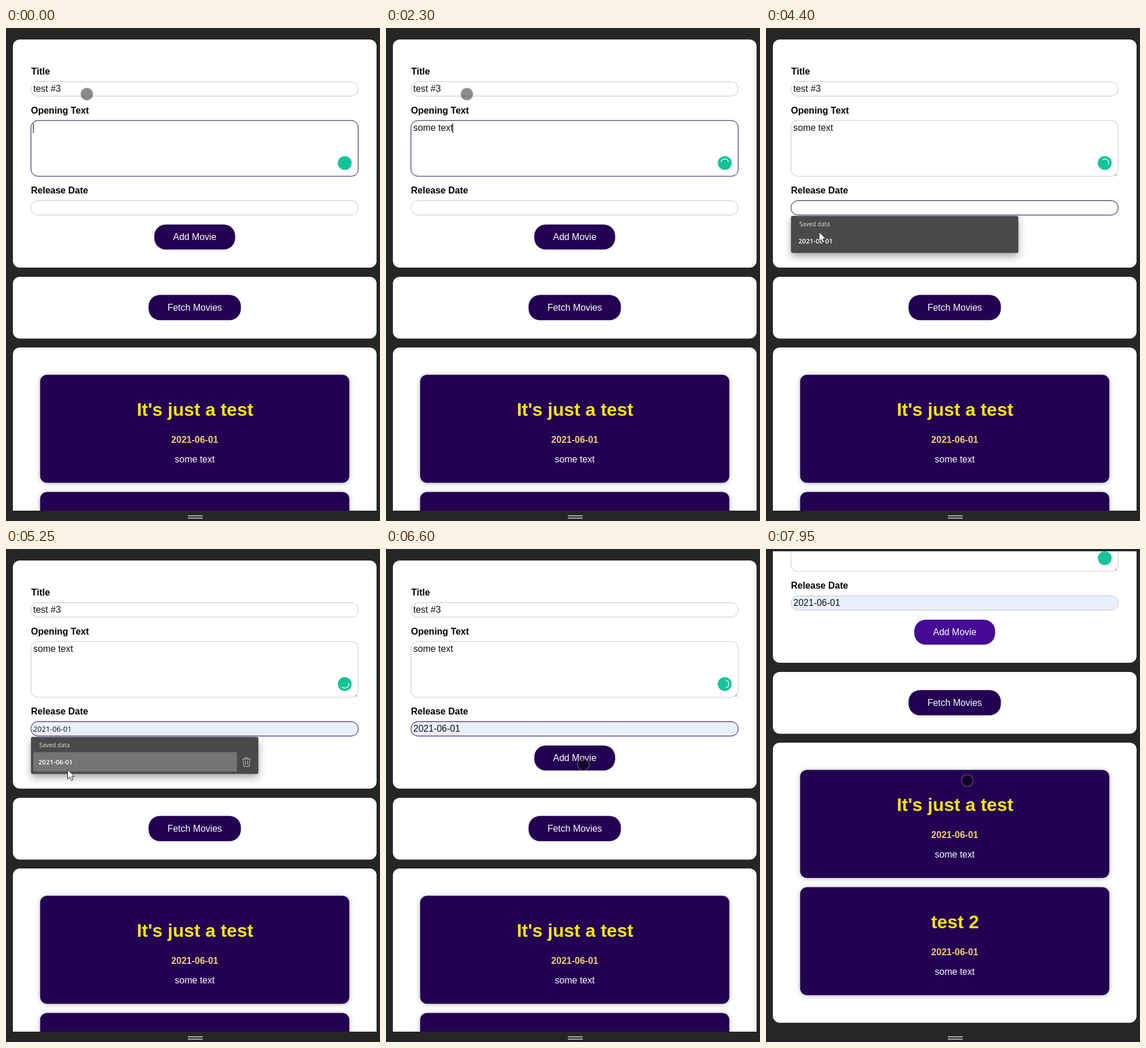
An HTML page for the animation above (8 s loop, 652 px wide and 858 px high).

```html
<!DOCTYPE html>
<html lang="en">
<head>
<meta charset="utf-8">
<title>Movie form</title>
<style>
  html, body { margin: 0; width: 100%; height: 100%; overflow: hidden; background: #262626; }
  svg { display: block; width: 652px; height: 858px; font: 16px "Liberation Sans", Arial, sans-serif; }
  text { white-space: pre; fill: #111; }
  .label { font-weight: bold; fill: #000; }
  .mid { text-anchor: middle; fill: #fff; }
  .panel { fill: #fff; }
  .field { fill: #fff; stroke: #c8c8c8; }
  .button { fill: #230052; }
  .movie { fill: #230052; filter: drop-shadow(0 1px 4px rgba(0, 0, 0, .28)); }
  .title { font-size: 32px; font-weight: bold; fill: #f7e702; }
  .date { font-weight: bold; fill: #f0d070; }
  .menu { font-family: "Open Sans", "Noto Sans", sans-serif; }
  .menu text { fill: #fff; font-size: 11.5px; font-weight: 600; }
  .menu .hint { fill: #ddd; font-size: 10.4px; font-weight: 400; }
  .sheet { fill: #4a4a4a; filter: drop-shadow(0 6px 7px rgba(0, 0, 0, .35)); }
  #date.preview { font: 12.8px "Open Sans", "Noto Sans", sans-serif; }
</style>
</head>
<body>
<svg viewBox="0 0 652 858">
  <rect width="652" height="858" fill="#262626"/>
  <g id="page">
    <rect class="panel" x="12" y="20" width="634" height="397" rx="12"/>
    <text class="label" x="44" y="81">Title</text>
    <rect class="field" x="43.5" y="93.5" width="570.5" height="25" rx="12"/>
    <text x="47.5" y="111">test #3</text>

    <text class="label" x="43.5" y="148.5">Opening Text</text>
    <rect class="field" id="area" x="43.5" y="161" width="570.5" height="97" rx="12"/>
    <path d="M608 257l4-4m-1 4l1-1" stroke="#777" fill="none"/>
    <text id="opening" x="47.5" y="179"></text>
    <rect id="caret" y="166" width="1" height="17" fill="#000"/>
    <circle cx="590.5" cy="235" r="12" fill="#15c39a"/>
    <path id="spinner" d="M-6.5 -2.4A6.9 6.9 0 0 1 6.5 -2.4" stroke="#d8fff3" stroke-width="1.6" fill="none" stroke-linecap="round"/>

    <text class="label" x="43.5" y="288">Release Date</text>
    <rect class="field" id="dateField" x="43.5" y="300.5" width="570.5" height="25" rx="12"/>
    <text id="date" x="47.5" y="318">2021-06-01</text>

    <rect class="button" id="add" x="258.5" y="342" width="141" height="43.5" rx="20"/>
    <text class="mid" x="329" y="368.5">Add Movie</text>

    <rect class="panel" x="12" y="433" width="634" height="107.5" rx="12"/>
    <rect class="button" x="248.5" y="464.5" width="161" height="44" rx="20"/>
    <text class="mid" x="329" y="491.5">Fetch Movies</text>

    <rect class="panel" x="12" y="556" width="634" height="487.5" rx="12"/>
    <g id="movies"></g>

    <g class="menu" id="menu">
      <rect class="sheet" x="43.5" y="327" width="396.5" height="64.5" rx="3"/>
      <text class="hint" x="58" y="345">Saved data</text>
      <g id="hover">
        <rect x="47.5" y="353.5" width="355" height="34" rx="2" fill="#757373"/>
        <path d="M412 365.500h14.500M416.500 365.500v-2.500h5.500v2.500M413.500 366l1 12.500h9.500l1-12.500M417.500 368.500v7M421 368.500v7" fill="none" stroke="#c4c4c4"/>
      </g>
      <text x="56.500" y="375">2021-06-01</text>
    </g>
  </g>

  <rect width="652" height="4" fill="#262626"/>
  <rect y="840" width="652" height="18" fill="#262626"/>
  <path d="M317 849h26M317 853h26" stroke="#aaa" stroke-width="1.800"/>

  <circle id="dot" r="10.300" fill="rgba(0,0,0,.45)" stroke="rgba(128,128,128,.42)" stroke-width="2"/>
  <path id="arrow" d="M0 0V16.500L3.900 12.900L6.400 18.800L9.200 17.600L6.700 11.800H11.800Z" fill="#fff" stroke="#222"/>
</svg>
<script>
const LOOP = 8000;
const $ = id => document.getElementById(id);
const show = (id, on) => $(id).setAttribute("visibility", on ? "inherit" : "hidden");
const move = (id, x, y, turn = 0) => $(id).setAttribute("transform", `translate(${x} ${y}) rotate(${turn})`);

$("movies").innerHTML = ["It's just a test", "test 2"].map((title, i) => `
  <g transform="translate(0 ${i * 204})">
    <rect class="movie" x="59.500" y="603.500" width="539" height="188" rx="12"/>
    <text class="mid title" x="329.500" y="675">${title}</text>
    <text class="mid date" x="329" y="722">2021-06-01</text>
    <text class="mid" x="329" y="756">some text</text>
  </g>`).join("");

const phrase = "some text";
const keyTimes = [700, 750, 950, 1150, 1350, 1500, 1650, 1850, 2000];

// Event times in ms
const loading = [1500, 7400], dateFocus = 3050, menuOpen = 3150, hoverAt = 4450,
      pick = 5500, submit = 6800, scrollAt = 7400;

// Rows of [time, value, ...]
const pointer = [
  [2400, 141, 115], [2950, 112, 314], [3400, 104, 316], [4100, 86, 340], [4400, 92, 355],
  [4850, 105, 381], [5250, 107, 384], [5600, 107, 384], [6450, 343, 374],
  [6600, 344, 375], [6950, 344, 375], [7350, 351, 401], [7950, 351, 403]
];
const spin = [[1500, -430], [2300, 0], [4400, 1115], [5250, 1590], [6600, 2245], [7400, 2640]];

const ease = p => p * p * (3 - 2 * p);
const linear = p => p;

function track(rows, t, curve) {
  const next = rows.findIndex(row => row[0] > t);
  if (next === 0) return rows[0].slice(1);
  if (next < 0) return rows.at(-1).slice(1);
  const a = rows[next - 1], b = rows[next];
  const p = curve((t - a[0]) / (b[0] - a[0]));
  return a.slice(1).map((v, i) => v + (b[i + 1] - v) * p);
}

function draw() {
  const t = performance.now() % LOOP;
  const between = (from, to) => t >= from && t < to;

  const scroll = Math.min(1, Math.max(0, (t - scrollAt) / 550));
  move("page", 0, -219 * (1 - (1 - scroll) ** 3.7));

  const opening = $("opening");
  opening.textContent = phrase.slice(0, keyTimes.filter(k => k <= t).length);
  const width = opening.textContent ? opening.getComputedTextLength() : 0;
  $("caret").setAttribute("x", Math.round(47 + width));
  show("caret", t < dateFocus);
  $("area").style.stroke = t < dateFocus ? "#230052" : "";

  show("spinner", between(...loading));
  move("spinner", 590.5, 235, track(spin, t, linear)[0]);

  $("dateField").style.stroke = between(dateFocus, submit) ? "#230052" : "";
  $("dateField").style.fill = t >= hoverAt ? "#e8f0fe" : "";
  show("date", t >= hoverAt);
  $("date").classList.toggle("preview", t < pick);

  const open = between(menuOpen, pick);
  show("menu", open);
  show("hover", open && t >= hoverAt);
  $("add").style.fill = t >= submit ? "#460897" : "";

  const [x, y] = track(pointer, t, ease);
  const arrow = open && y > 327;
  show("arrow", arrow);
  show("dot", !arrow);
  move("arrow", x + .5, y);
  move("dot", x, y);

  requestAnimationFrame(draw);
}
draw();
</script>
</body>
</html>
```
